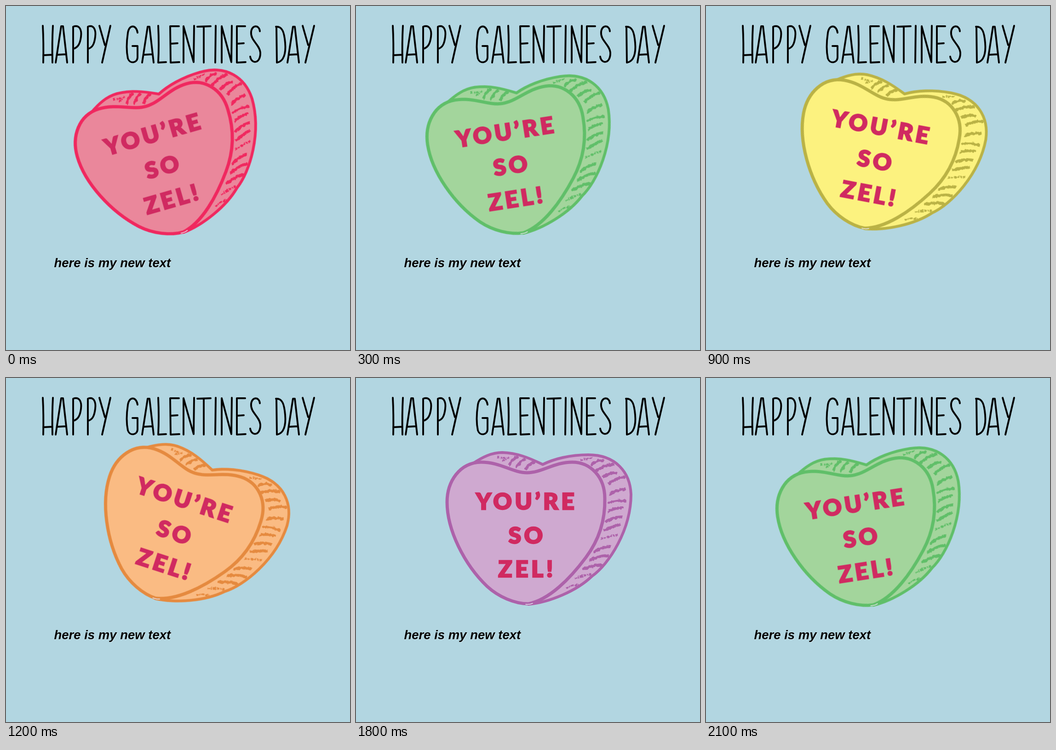
Animation of 748x748 px, one loop 2.4 s. Source, as an HTML page:

```html
<!DOCTYPE html>
<html lang="en">
<head>
<meta charset="utf-8">
<title>Candy heart card</title>
<style>
  html, body { margin: 0; width: 100%; height: 100%; overflow: hidden; background: #b2d6e1; }
  svg { display: block; width: 100vw; height: 100vh; }

  .title { fill: none; stroke: #000; stroke-width: 3.9; stroke-linecap: round; stroke-linejoin: round; }
  .note { font: italic bold 27.5px "Liberation Sans", Arial, sans-serif; text-shadow: 1px 1px rgba(255, 255, 255, .4); }

  .heart { animation: rock 2400ms step-end infinite; }
  .heart path { stroke: currentColor; stroke-linecap: round; stroke-linejoin: round; }
  .edge { stroke-width: 6; }
  .face { stroke-width: 7; }
  .marks { fill: none; stroke-width: 6; }
  .heart .scribble { fill: none; stroke-width: 4; stroke-linecap: butt; stroke-dasharray: 5 2 3 1.5 7 2; }
  .heart .glint { fill: none; stroke: #e6e4ee; stroke-width: 1.6; }
  .words {
    font: 900 50px Lato, "Open Sans", sans-serif; letter-spacing: 6.4px; text-anchor: middle;
    fill: #d02a61; stroke: #d02a61; stroke-width: 2.4;
  }

  /* The candy swings from side to side, one flavour per pose. */
  @keyframes rock {
    0%, 100%     { transform: translate(338px, 349px) rotate(-16deg); fill: #ea879b; color: #f0285f; }
    12.5%, 87.5% { transform: translate(334.5px, 346px) rotate(-8.7deg); fill: #a3d59c; color: #60bf69; }
    25%, 75%     { transform: translate(368px, 341px); fill: #cfa9d0; color: #ad62aa; }
    37.5%, 62.5% { transform: translate(366px, 334.5px) rotate(10.7deg); fill: #fcf27f; color: #bab245; }
    50%          { transform: translate(365px, 334px) rotate(18deg); fill: #fabb83; color: #e58a3f; }
  }
</style>
</head>
<body>
<svg viewBox="0 0 748 748">
  <defs>
    <filter id="brush" color-interpolation-filters="sRGB">
      <feTurbulence type="fractalNoise" baseFrequency=".16" numOctaves="2" seed="9"/>
      <feDisplacementMap in="SourceGraphic" scale="6" xChannelSelector="R" yChannelSelector="G"/>
    </filter>
  </defs>

  <g class="title" role="img" aria-label="HAPPY GALENTINES DAY">
    <!-- HAPPY -->
    <path d="M80 43Q82 80 81 123M102 43Q100 80 101 123M81 107L101 106"/>
    <path d="M108 123L120 44L124 44L133 123M112 106L130 105"/>
    <path d="M146 123L146 45C160 40 165 52 163 67C161 83 156 90 147 93"/>
    <path d="M178 123L178 45C191 40 196 52 194 67C192 83 188 90 179 93"/>
    <path d="M203 43L215 85M227 43L209 123"/>
    <!-- GALENTINES -->
    <path d="M286 58C284 41 268 39 265 58C262 78 262 100 265 114C269 126 285 125 286 112L286 87L275 87"/>
    <path d="M296 123L308 45L312 45L321 123M300 106L318 105"/>
    <path d="M331 43Q333 85 331 123L348 122"/>
    <path d="M376 44L357 44L358 123L377 122M358 82L373 81"/>
    <path d="M386 123L386 44L408 122L409 43"/>
    <path d="M416 45L445 44M430 45L430 123"/>
    <path d="M456 43L455 123"/>
    <path d="M469 123L469 44L490 122L491 43"/>
    <path d="M520 44L502 44L502 123L521 122M502 82L517 81"/>
    <path d="M552 55C551 41 535 40 533 56C531 75 551 83 553 101C554 125 534 128 531 110"/>
    <!-- DAY -->
    <path d="M588 45L589 123C604 121 609 103 607 80C605 57 601 44 587 45"/>
    <path d="M612 123L624 45L628 45L637 123M616 106L634 105"/>
    <path d="M645 43L657 85M670 43L651 123"/>
  </g>

  <g class="heart">
    <g transform="translate(-368 -341)">
      <path class="edge" d="M254 186C275 172 295 162 318 162C350 163 375 173 406 188C430 176 465 167 505 167C565 167 596 205 598 253C598 330 550 405 513 431C480 463 420 488 375 492"/>
      <g class="marks" filter="url(#brush)">
        <path d="M334 188q6-11 17-16M350 192q6-11 17-15M370 197q5-10 17-13"/>
        <path d="M512 189q9-9 24-10M521 203q14-12 37-15M539 214q12-8 27-7M551 229q13-11 32-14M553 252q14-9 31-10M551 271q14-6 34-4M549 290q14-8 30-8M544 312q14-9 32-10M541 331q14-7 31-12"/>
        <path d="M519 378q14-9 32-12M509 396q16-9 38-10M496 415q17-8 38-9"/>
        <path class="scribble" d="M307 172l18 3M318 181l15-8M488 179l26-6M533 350q16-6 36-9M476 436q17-7 37-9M457 457q12-6 28-8"/>
      </g>
      <path class="face" d="M372 206C340 206 315 183 272 183C225 184 198 225 198 270C198 330 235 405 285 453C310 476 345 491 375 491C420 482 465 437 500 390C530 350 542 305 541 262C541 215 510 183 470 183C430 183 405 206 372 206Z"/>
      <path class="glint" d="M369 492q8 1 15-2"/>
      <g class="words">
        <text x="371" y="286">YOU’RE</text>
        <text x="372" y="359.5">SO</text>
        <text x="372" y="432.5">ZEL!</text>
      </g>
    </g>
  </g>

  <text class="note" x="104.5" y="568">here is my new text</text>
</svg>
</body>
</html>
```
